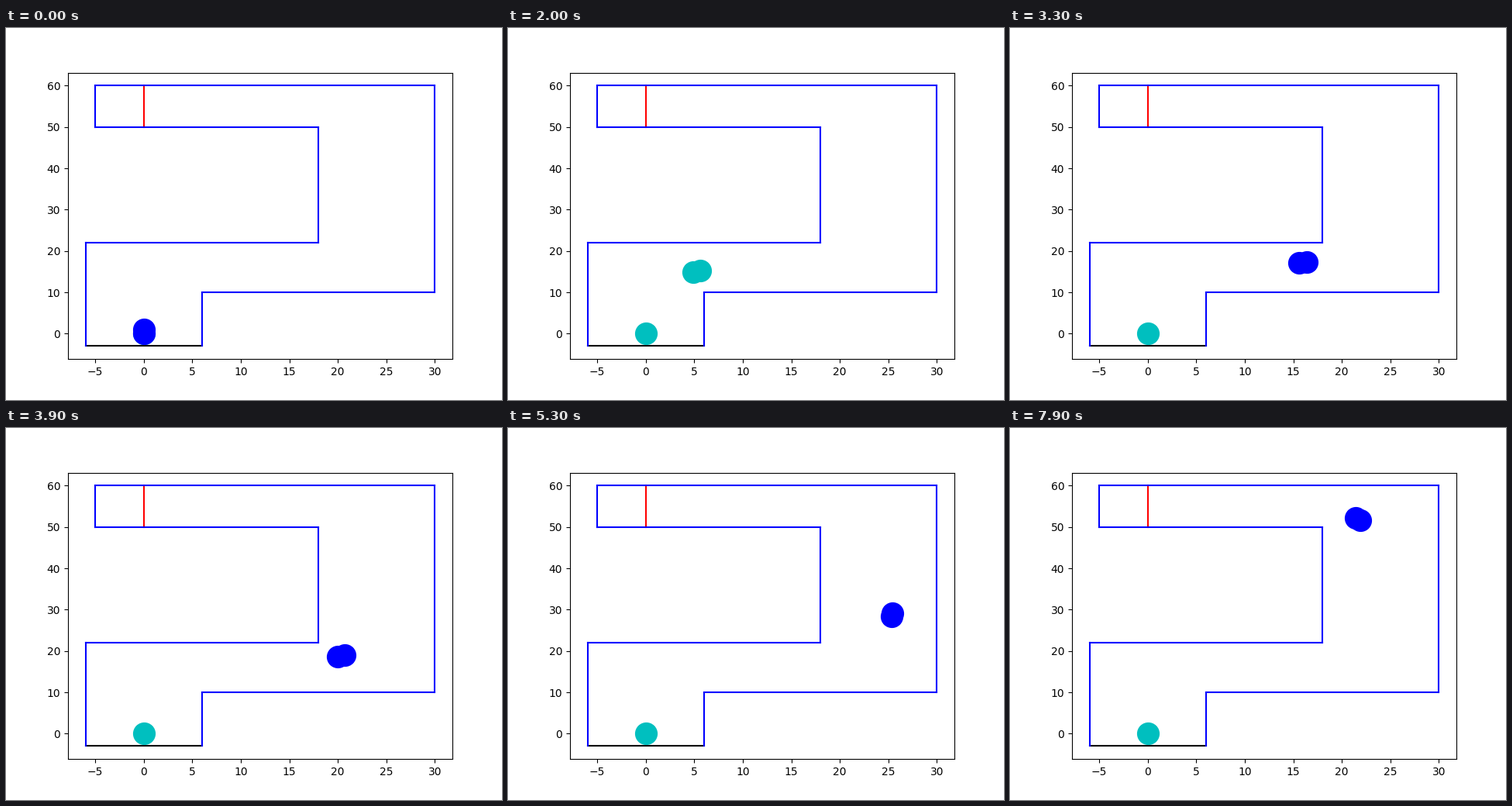
Write a matplotlib script that moves like this. It is 640 by 480 pixels and loops after 8 s.

```python
import numpy as np
import matplotlib.pyplot as plt
from matplotlib.animation import FuncAnimation

FRAMES = 80
STEP_MS = 100

WALLS = [(-6, -3), (-6, 22), (18, 22), (18, 50), (-5, 50),
         (-5, 60), (30, 60), (30, 10), (6, 10), (6, -3)]

# Key points of the drive, evenly spaced in time
SPACING = 9
ROUTE = np.array([(0, 0), (0.25, 8.2), (3.6, 14.07), (10.44, 16.9),
                  (17.95, 17.6), (23.32, 21.72), (25.39, 29.23),
                  (24.7, 38.03), (23.84, 46.55), (20.97, 52.75),
                  (14.9, 54.65)])

# Steps during which the car steers to the right
RIGHT_TURNS = [(7, 32), (63, 69)]


def position(step):
    """Point on the smooth cubic curve through the route."""
    i, u = divmod(step / SPACING, 1)
    i = int(i)
    (p, q), (dp, dq) = ROUTE[i:i + 2], SLOPES[i:i + 2]
    return ((1 + 2 * u) * (1 - u) ** 2 * p + u * (1 - u) ** 2 * dp
            + u ** 2 * (3 - 2 * u) * q + u ** 2 * (u - 1) * dq)


SLOPES = np.gradient(ROUTE, axis=0)

fig, ax = plt.subplots(figsize=(6.4, 4.8), dpi=100)
ax.plot([0, 0], [50, 60], "r")
ax.plot([-6, 6], [-3, -3], "k")
for start, end in zip(WALLS, WALLS[1:]):
    ax.plot(*zip(start, end), "b")
ax.plot(0, 0, "co", markersize=20)
car, = ax.plot([], [], "bo", markersize=20)
ax.set_xlim(-7.8, 31.8)
ax.set_ylim(-6.15, 63.15)


def draw(n):
    car.set_data(*zip(position(n), position(n + 1)))
    right = any(a <= n <= b for a, b in RIGHT_TURNS)
    car.set_color("c" if right else "b")
    return car,


anim = FuncAnimation(fig, draw, frames=FRAMES, interval=STEP_MS,
                     init_func=lambda: draw(0), repeat=True, repeat_delay=0)
plt.show()
```
